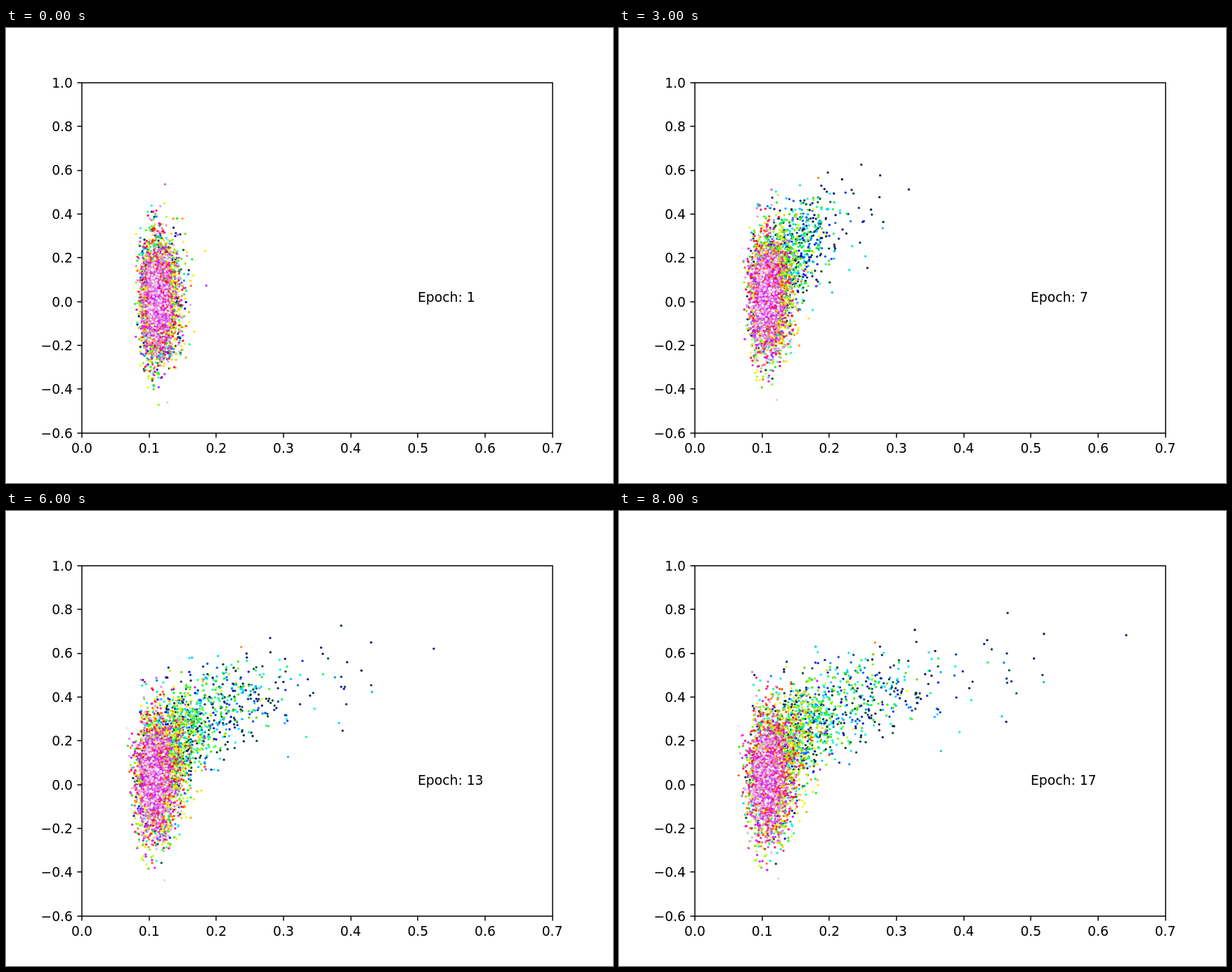
Write an HTML page with a canvas that moves like this. It is 864 by 648 pixels and loops after 8.5 s.

```html
<!DOCTYPE html>
<html>
<head>
<meta charset="utf-8">
<style>
html, body { margin: 0; width: 100%; height: 100%; overflow: hidden; background: #fff; }
canvas { display: block; }
</style>
</head>
<body>
<canvas id="stage" width="864" height="648"></canvas>
<script>
const ctx = document.getElementById('stage').getContext('2d');
const EPOCHS = 17, STEP = 500, COUNT = 5000;
const LEFT = 108, RIGHT = 777.6, TOP = 77.8, BOTTOM = 576.7;
const { round, exp, log, sqrt, cos, PI } = Math;

// Evenly spaced stops, from the first dots to the last
const PALETTE = ('000080 005a0a 0000ff 009bff 00f0ff 00ffaf 00ff20 55dc00 78ff00 b4ff20 f0ff00 ' +
  'ffe600 ffcd00 ff9600 ff3c00 ff0040 ff00ff b432ff dc78f0 f0a0f0 fef8fe')
  .split(' ').map(hex => hex.match(/../g).map(h => parseInt(h, 16)));

function color(u) {
  const at = u * (PALETTE.length - 1), i = Math.floor(at);
  const mixed = PALETTE[i].map((c, k) => round(c + (PALETTE[i + 1][k] - c) * (at - i)));
  return `rgb(${mixed})`;
}

let seed = 20;
function random() {
  seed = seed + 0x6D2B79F5 | 0;
  let t = Math.imul(seed ^ seed >>> 15, 1 | seed);
  t ^= t + Math.imul(t ^ t >>> 7, 61 | t);
  return ((t ^ t >>> 14) >>> 0) / 4294967296;
}
const gauss = () => sqrt(-2 * log(1 - random())) * cos(2 * PI * random());

// Early dots travel far to the right, late ones hardly move
const dots = Array.from({ length: COUNT }, (_, i) => {
  const u = i / COUNT, z = gauss();
  const pull = 65 * exp(-4 * u) * (-log(1 - random())) ** 1.5;
  return {
    x: 216 + 12.5 * z + .8 * z * z, y: 40 * gauss(),
    reach: 450 * (1 - exp(-pull / 330)),
    dx: 7 * gauss(), dy: 13 * gauss(), fill: color(u)
  };
});
Object.assign(dots[0], { x: 219, y: -35, reach: 510, dx: 0, dy: 0 });

function drawDots(epoch) {
  const t = (epoch - 1) / (EPOCHS - 1);
  const progress = t + .2 * t * t * (1 - t);
  const settle = 7 * (1 - exp((1 - epoch) / 2));
  for (const p of dots) {
    const d = p.reach * progress;
    const lift = .17 * d + 100 * (1 - exp(-d / 42));
    const spread = .7 + .3 * exp(-d / 60);
    ctx.fillStyle = p.fill;
    ctx.beginPath();
    ctx.arc(p.x + d + p.dx * t - settle, 388 - lift + p.y * spread + p.dy * t, 1.65, 0, 7);
    ctx.fill();
  }
}

function tick(x, y, dx, dy) {
  ctx.beginPath();
  ctx.moveTo(x, y);
  ctx.lineTo(x + dx, y + dy);
  ctx.stroke();
}

// Lines and baselines sit on whole pixels
function drawAxes() {
  const [left, right, top, bottom] = [LEFT, RIGHT, TOP, BOTTOM].map(round);
  ctx.strokeStyle = ctx.fillStyle = '#000';
  ctx.lineWidth = 1.5;
  ctx.font = '18.75px "DejaVu Sans", sans-serif';
  ctx.strokeRect(left, top, right - left, bottom - top);
  ctx.textAlign = 'center';
  for (let i = 0; i <= 7; i++) {
    const x = LEFT + (RIGHT - LEFT) * i / 7;
    tick(round(x), bottom, 0, 6.6);
    ctx.fillText((i / 10).toFixed(1), x, 605);
  }
  ctx.textAlign = 'right';
  for (let i = 0; i <= 8; i++) {
    const y = BOTTOM - (BOTTOM - TOP) * i / 8;
    tick(left, round(y), -6.6, 0);
    ctx.fillText(((i - 3) / 5).toFixed(1).replace('-', '\u2212'), 95, round(y + 6.9));
  }
}

let shown = 0;
function frame() {
  const epoch = Math.floor(performance.now() / STEP) % EPOCHS + 1;
  if (epoch !== shown) {
    shown = epoch;
    ctx.fillStyle = '#fff';
    ctx.fillRect(0, 0, 864, 648);
    drawDots(epoch);
    drawAxes();
    ctx.textAlign = 'left';
    ctx.fillText('Epoch: ' + epoch, 586, 390);
  }
  requestAnimationFrame(frame);
}
frame();
</script>
</body>
</html>
```
